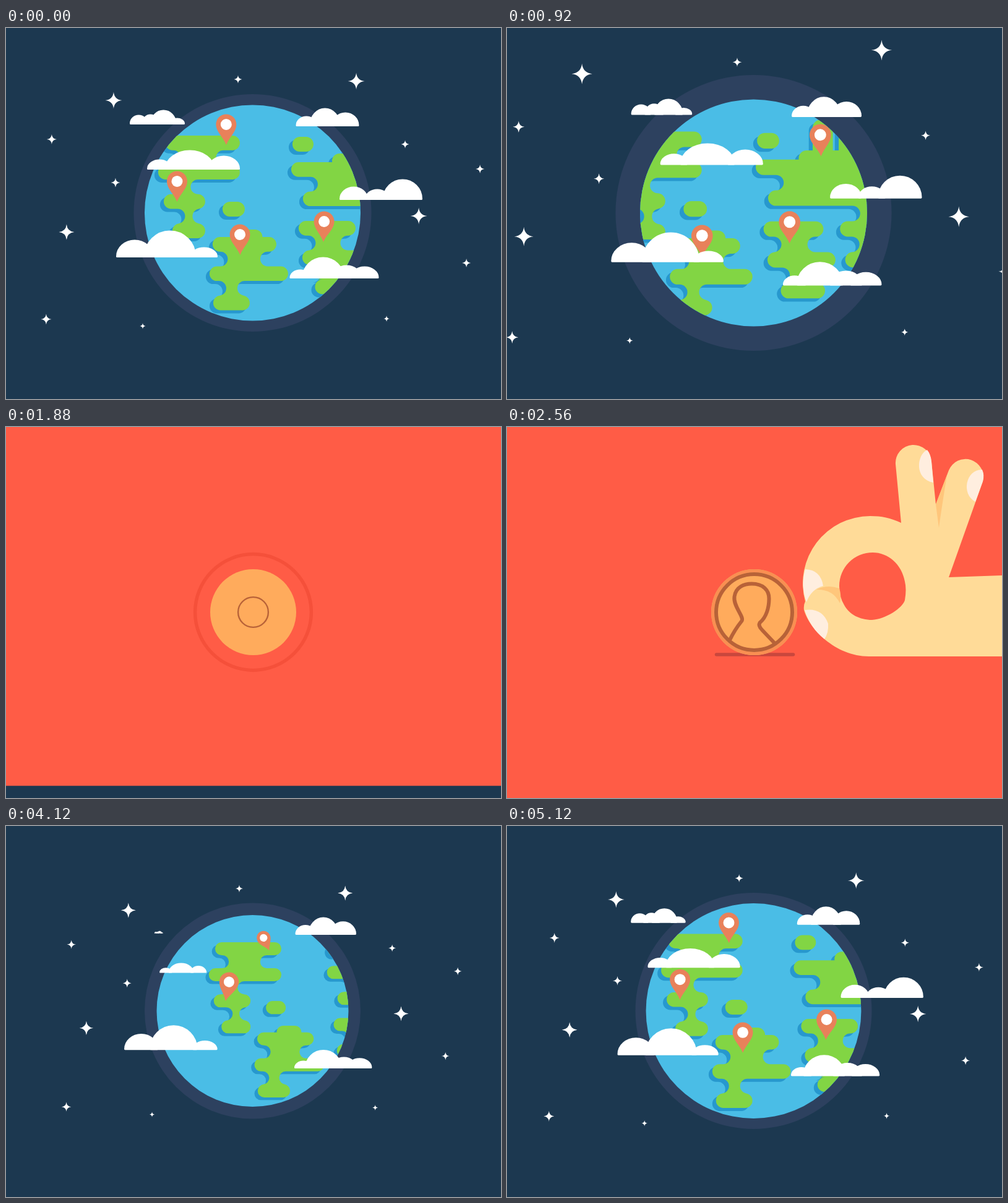
Recreate the animation shown at these times as an HTML page with a canvas. Size 800 by 600 pixels, loop 5160 ms.

```html
<!DOCTYPE html>
<html lang="en">
<head>
<meta charset="utf-8">
<title>Globe and coin</title>
<style>
html, body { margin: 0; width: 100%; height: 100%; overflow: hidden; background: #1c3850; }
canvas { display: block; width: 800px; height: 600px; }
</style>
</head>
<body>
<canvas id="stage" width="800" height="600"></canvas>
<script>
const ctx = document.getElementById('stage').getContext('2d');
const LOOP = 5160, CX = 398.5, CY = 299, R0 = 174.5, ROW = 23.7;
const C = {
  night: '#1c3850', air: '#2d415f', sea: '#4abde6', deep: '#2798ce', land: '#82d544',
  pin: '#e8815a', red: '#ff5c46', coin: '#ffab5c', rim: '#f98f52', line: '#b86238',
  skin: '#ffdb98', shade: '#ffc67b', nail: '#ffeedf', streak: '#ff9f57'
};

// Easing helpers
const clamp = v => Math.max(0, Math.min(1, v));
const span = (t, a, b) => clamp((t - a) / (b - a));
const mix = (a, b, p) => a + (b - a) * p;
const wave = p => (1 - Math.cos(Math.PI * p)) / 2;
const easeOut = p => 1 - (1 - p) ** 3;
const backOut = p => p <= 0 ? 0 : 1 + 2.70158 * (p - 1) ** 3 + 1.70158 * (p - 1) ** 2;

// Stars: x, y, radius, depth layer
const LAYERS = [[.353, .0055], [.255, .025], [.192, .03]];
const STARS = [
  [174, 117, 13.5, 0], [566, 86, 13.5, 0], [98, 330, 12.5, 0], [667, 304, 13.5, 0],
  [74, 180, 8, 1], [65, 471, 8.5, 1], [766, 228, 7, 1], [744, 380, 7, 1],
  [375, 83, 6.5, 2], [645, 188, 6.5, 2], [177, 250, 7.5, 2], [221, 482, 4.7, 2], [615, 470, 4.9, 2]
];

// Clouds: centre x, base y, drift, start time, humps of [dx, half width, height]
const CLOUDS = [
  [260, 371, 14, 3800, [[-52, 30, 27], [5, 42, 42], [60, 22, 15]]],
  [303, 229, 38, 4060, [[-55, 20, 15], [-6, 40, 30], [49, 26, 21]]],
  [244.5, 156, 22, 4105, [[-30, 14.5, 14], [-11, 14, 15], [10, 21, 22], [32, 12.5, 9]]],
  [519.5, 159, -16, 3880, [[-34, 17, 15], [-4, 25, 28], [29, 22, 21]]],
  [606, 278, -32, 4140, [[-44, 23, 20], [-6, 20, 16], [35, 32, 32]]],
  [530.5, 405, -19, 3976, [[-55, 17, 13], [-18, 34, 33], [20, 24, 20], [49, 23, 18]]]
];

// Pins: tip x and y from the globe centre, show time, hide time
const PINS = [
  [-42.5, -110, 4060, 5610], [-122, -18, 3820, 5560], [-20, 68, 4230, 6400],
  [114.5, 47, 4400, 6400], [163, -87, 5500, 6400]
];

// A stack of rows that alternate between a rounded bar and a hollow neck
function stack(path, top, rows) {
  const h = ROW / 2, n = rows.length;
  rows.forEach(([, r], i) => {
    const neck = i % 2, x = neck ? r + h : r - h, y = top + (i + .5) * ROW;
    if (!i) path.moveTo(x, top);
    path.arc(x, y, h, -Math.PI / 2, Math.PI / 2, !!neck);
  });
  for (let i = n - 1; i >= 0; i--) {
    const neck = i % 2, l = rows[i][0], x = neck ? l - h : l + h;
    path.arc(x, top + (i + .5) * ROW, h, Math.PI / 2, -Math.PI / 2, !!neck);
  }
  path.closePath();
}

function bar(path, l, r, top, h = 24) {
  path.roundRect(l, top, r - l, h, 12);
}

const land = new Path2D();
stack(land, -125, [[-141, -20.5], [-116, -59], [-152.5, -20.5], [-117, -100], [-143.5, -76.5], [-109, -97], [-129.5, -76.5]]);
bar(land, -48.5, -12.5, -18);
stack(land, 39, [[-64.5, 38.5], [-40, 12.5], [-69.5, 57.5], [-42.5, -24.5], [-63.5, -4.5]]);
bar(land, -29, 16, 27);
bar(land, 64.5, 98.5, -123);
stack(land, -82, [[62.5, 400], [105.5, 400], [81.5, 400], [223, 400], [192, 400], [222, 400], [200, 400]]);
bar(land, 128.5, 400, -96);
bar(land, 150, 181, -143, 60);
bar(land, 190, 330, -143, 60);
stack(land, 13, [[74.5, 166.5], [102, 142], [80.5, 185], [115, 150], [101, 169]]);

const HAND = new Path2D(`M1200 226L800 240L714 243L769 88A29 29 0 0 0 714 70L693 125L686 56
  A29 29 0 0 0 628 60L637 155C620 147 605 144 587 144A109 109 0 0 0 482 282Q479 288 480 296
  C488 325 530 371 585 371L1200 371Z
  M591 203A54 54 0 0 0 537 257Q537 275 545 288C553 303 570 312 590 312
  C612 311 640 292 643 280Q646 262 643 250C638 222 616 203 591 203Z`);
const SHADES = new Path2D(`M711 78L693 125L698 163Q701 140 711 78Z
  M500 263Q518 254 537 261Q541 273 538 285Q527 262 500 263Z`);
const NAILS = new Path2D(`M482 230Q507 231 511 257Q492 262 484 283Q474 256 482 230Z
  M481 296Q510 292 519 318Q520 333 513 343Q490 325 481 296Z
  M679 37C662 45 658 84 689 90L686 56Q685 44 679 37Z
  M768 69C742 68 733 108 757 121L769 88Q772 78 768 69Z`);
const BUST = new Path2D(`M-40 46Q-32 29 -20 14C-16 7 -34 -9 -32 -25C-30 -41 -16 -46 -4 -46
  C14 -46 24 -36 24 -22C24 -8 20 8 9 17Q6 22 13 29L32 49`);

// Drawing helpers
function at(x, y, scale, angle, draw) {
  ctx.save();
  ctx.translate(x, y);
  ctx.rotate(angle);
  ctx.scale(scale, scale);
  draw();
  ctx.restore();
}

function disc(x, y, r, color) {
  ctx.fillStyle = color;
  ctx.beginPath();
  ctx.arc(x, y, Math.max(0, r), 0, 7);
  ctx.fill();
}

function ring(r, width, color) {
  ctx.strokeStyle = color;
  ctx.lineWidth = width;
  ctx.beginPath();
  ctx.arc(0, 0, r, 0, 7);
  ctx.stroke();
}

function dash(x1, x2, y, width, color) {
  ctx.strokeStyle = color;
  ctx.lineWidth = width;
  ctx.lineCap = 'round';
  ctx.beginPath();
  ctx.moveTo(x1, y);
  ctx.lineTo(x2, y);
  ctx.stroke();
}

function sparkle(x, y, r, angle = 0) {
  at(x, y, r, angle, () => {
    ctx.fillStyle = '#fff';
    ctx.beginPath();
    ctx.moveTo(0, -1);
    for (let i = 1; i <= 4; i++) {
      const a = i * Math.PI / 2, m = a - Math.PI / 4;
      ctx.quadraticCurveTo(.13 * Math.sin(m), -.13 * Math.cos(m), Math.sin(a), -Math.cos(a));
    }
    ctx.fill();
  });
}

// Camera zoom, 0 to 1
function zoom(t) {
  if (t < 1180) return wave((t + 660) / 1840);
  if (t < 3880) return 1;
  if (t < 4500) return 1 - easeOut(span(t, 3880, 4120));
  return wave((t - 4500) / 1840);
}

function stars(t, tau) {
  const u = zoom(t) - .285, early = clamp(-tau / 1.04);
  for (const [x, y, r, layer] of STARS) {
    const [gain, dip] = LAYERS[layer];
    const s = 1 + gain * u - dip * early;
    sparkle(CX + (x - CX) * s, CY + (y - CY) * s, r * s);
  }
}

function pin(x, y, scale, angle) {
  at(x, y, scale, angle, () => {
    ctx.fillStyle = C.pin;
    ctx.beginPath();
    ctx.moveTo(0, 0);
    ctx.bezierCurveTo(-5, -13, -16.5, -21, -16.5, -33);
    ctx.arc(0, -33, 16.5, Math.PI, 0);
    ctx.bezierCurveTo(16.5, -21, 5, -13, 0, 0);
    ctx.fill();
    disc(0, -33, 9, '#fff');
  });
}

function cloud(x, y, scale, humps) {
  at(x, y, scale, 0, () => {
    ctx.fillStyle = ctx.strokeStyle = '#fff';
    ctx.lineWidth = 3;
    ctx.lineJoin = 'round';
    for (const [dx, w, h] of humps) {
      ctx.beginPath();
      ctx.ellipse(dx, -1.5, w - 1.5, h - 1.5, 0, Math.PI, 0);
      ctx.closePath();
      ctx.fill();
      ctx.stroke();
    }
  });
}

function globe(t, tau) {
  const grow = backOut(tau < -1 ? span(t, 3700, 4100) : 1);
  const shrink = tau > 0 ? wave(span(t, 1240, 1700)) : 0;
  const r = mix((R0 + 14 * tau - 4.58 * tau * tau) * grow, 69, shrink);
  const air = mix(Math.min(223.5, 192 + 25.8 * tau + 8.6 * tau * tau) * grow, 69, shrink);
  const turn = -67 * tau + 3 * tau * tau, g = r / R0;
  disc(CX, CY, air, C.air);
  disc(CX, CY, r, C.sea);

  ctx.save();
  ctx.beginPath();
  ctx.arc(CX, CY, Math.max(0, r), 0, 7);
  ctx.clip();
  at(CX, CY, g, 0, () => {
    ctx.translate(turn - 6, 5);
    ctx.fillStyle = C.deep;
    ctx.fill(land);
    ctx.translate(6, -5);
    ctx.fillStyle = C.land;
    ctx.fill(land);
  });
  ctx.restore();

  const clock = LOOP + tau * 1000;
  const away = 1 - wave(span(clock, 6360, 6600));
  for (const [x, y, show, hide] of PINS) {
    const age = (clock - show) / 1000;
    const size = backOut(clamp(age / .3)) * (1 - span(clock, hide - 200, hide)) * away;
    if (size <= 0) continue;
    const swing = -.75 * Math.cos(age * Math.PI * 4) * Math.exp(-age / .25);
    pin(CX + (x + turn) * g, CY + y * g, size * Math.max(.95, g), swing);
  }

  const k = 1 + .117 * tau, drift = .915 * tau + .187 * tau * tau;
  for (const [x, y, d, show, humps] of CLOUDS) {
    const size = backOut(clamp((clock - show) / 400)) * away;
    if (size > 0) cloud(CX + (x - CX) * k + d * drift, CY + (y - CY) * k, k * size, humps);
  }
}

function coin(t) {
  const roll = Math.max(0, t - 2740);
  const x = 399.5 - 1.58 * roll;
  if (x < -90) return;
  const ripple = span(t, 1740, 2040);
  if (ripple > 0 && ripple < 1) {
    ctx.save();
    ctx.globalAlpha = Math.min(1, (1 - ripple) * 1.9);
    at(399.5, 299.5, 1, 0, () => ring(mix(69, 122, ripple), 5.5, '#f5503a'));
    ctx.restore();
  }
  const line = span(t, 2080, 2220) * (1 - span(t, 2740, 2820));
  if (line > 0) dash(400.5 - 62 * line, 400.5 + 62 * line, 368, 5.5, '#c9473d');

  ctx.save();
  ctx.globalAlpha = span(t, 1620, 1740);
  at(x, 299.5, 1, -roll / 69 * 1.5, () => {
    disc(0, 0, 69.5, C.coin);
    const p = easeOut(span(t, 1850, 2050));
    if (p > 0) {
      ctx.globalAlpha = span(t, 1900, 2060);
      ring(67, 5, C.rim);
      ctx.globalAlpha = 1;
      ring(61.5 * p, 6 * p, C.line);
    }
    ctx.globalAlpha = span(t, 2040, 2180);
    ctx.lineWidth = 6;
    ctx.lineJoin = 'round';
    ctx.stroke(BUST);
  });
  ctx.restore();
}

function hand(t) {
  if (t < 2260 || t > 3120) return;
  let x = 345 * (1 - easeOut(span(t, 2260, 2520)));
  x += 24 * wave(span(t, 2600, 2700)) - 54 * wave(span(t, 2700, 2770));
  x += 400 * span(t, 2800, 3080) ** 2;
  at(x, 0, 1, 0, () => {
    ctx.fillStyle = C.skin;
    ctx.fill(HAND, 'evenodd');
    ctx.fillStyle = C.shade;
    ctx.fill(SHADES);
    ctx.fillStyle = C.nail;
    ctx.fill(NAILS);
  });
}

// Left end, length and height of each streak, as they stand at 3160 ms
function streaks(t) {
  if (t < 2820 || t > 3300) return;
  const move = (3160 - t) * .45;
  const size = t < 3160 ? wave(span(t, 2820, 2960)) * (1 + (3160 - t) / 400) : 1 - span(t, 3160, 3300);
  if (size <= 0) return;
  for (const [x, len, y] of [[82.5, 68, 321.5], [205.5, 11, 321.5], [125.5, 34, 352]]) {
    dash(x + move, x + move + len * size, y, 5.5, C.streak);
  }
}

function draw(t) {
  const tau = t > 3400 ? (t - LOOP) / 1000 : Math.min(t / 1000, 1.25);
  ctx.fillStyle = C.night;
  ctx.fillRect(0, 0, 800, 600);
  if (t < 1960 || t > 3400) stars(t, tau);

  const top = 600 * wave(span(t, 3420, 3680));
  const bottom = 600 * wave(span(t, 1660, 1910));
  ctx.fillStyle = C.red;
  if (bottom > top) ctx.fillRect(0, top, 800, bottom - top);

  if (t < 1740 || t > 3700) globe(t, tau);
  if (t > 1620 && t < 3400) {
    coin(t);
    streaks(t);
    hand(t);
    const glint = span(t, 3040, 3300);
    if (glint > 0 && glint < 1) {
      sparkle(384, 253.5, 8.5 * Math.sin(Math.PI * glint), .2 + (t - 3160) / 300);
    }
  }
}

const start = performance.now();
function tick() {
  draw((performance.now() - start) % LOOP);
  requestAnimationFrame(tick);
}
tick();
</script>
</body>
</html>
```
